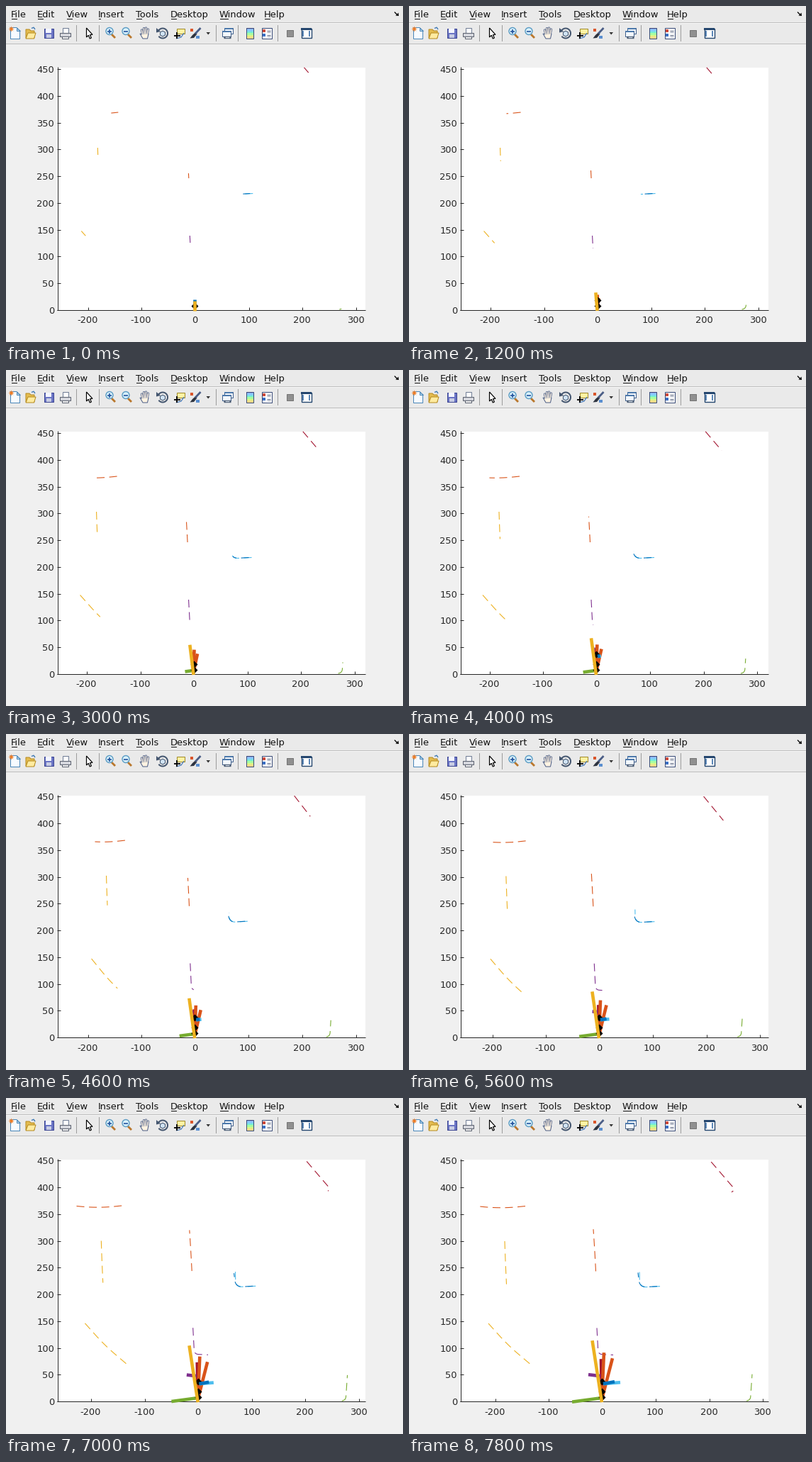
A matplotlib script that plays this animation: 560x474 px, repeating every 8000 ms.

```python
import numpy as np
import matplotlib.pyplot as plt
from matplotlib.animation import FuncAnimation
from matplotlib.patches import Circle, Polygon, Rectangle

W, H, DPI = 560, 474, 100
PX = 72 / DPI
STEP, FRAMES = 200, 40
UNIT = 0.7556                      # pixels per axis unit
LEFT, RIGHT, TOP = 72, 507, 87
INK = "#262626"
BLUE, ORANGE, YELLOW, PURPLE, GREEN, CYAN, MAROON = (
    "#0072BD", "#D95319", "#EDB120", "#7E2F8E", "#77AC30", "#4DBEEE", "#A2142F")

# The simulation advances once per step, apart from a few pauses (step numbers).
PAUSES = (5, 8, 11, 18, 22, 27, 29, 36)
LAST = FRAMES - 1 - len(PAUSES)
REFIT = 18                         # tick at which the view is fitted again

fig = plt.figure(figsize=(W / DPI, H / DPI), dpi=DPI, facecolor="#F0F0F0")
ax = fig.add_axes([0, 0, 1, 1])
ax.set_xlim(0, W)
ax.set_ylim(H, 0)
ax.axis("off")


def rect(x, y, w, h, fc, ec="none", lw=1, z=1):
    return ax.add_patch(Rectangle((x, y), w, h, fc=fc, ec=ec, lw=lw * PX, zorder=z))


def poly(pts, fc, ec="none", lw=1):
    ax.add_patch(Polygon(pts, fc=fc, ec=ec, lw=lw * PX, zorder=2))


def disc(x, y, r, fc, ec="none", lw=1):
    ax.add_patch(Circle((x, y), r, fc=fc, ec=ec, lw=lw * PX, zorder=2))


def line(pts, color, lw=1.0, z=3, **kw):
    xs, ys = zip(*pts) if len(pts) else ((), ())
    kw.setdefault("solid_capstyle", "butt")
    return ax.plot(xs, ys, color=color, lw=lw * PX, zorder=z, **kw)[0]


def label(x, y, s, color=INK, ha="center"):
    return ax.text(x, y, s, fontsize=13 * PX, color=color, ha=ha,
                   va="baseline", family="DejaVu Sans", zorder=4)


# ---- menu bar and toolbar ----
def menu_bar():
    rect(0, 0, W, 53, "#EAEAEA")
    rect(0, 23, W, 1, "#BEBEBE")
    rect(0, 24, W, 1, "#F8F8F8")
    rect(0, 53, W, 1, "#BEBEBE")
    words = "File Edit View Insert Tools Desktop Window Help".split()
    for x, word in zip((8, 45, 86, 131, 184, 233, 302, 365), words):
        label(x - 1, 16, word, "#111111", "left")
        rect(x, 18, {"I": 3, "W": 12}.get(word[0], 8), 1, "#111111")
    line([(548, 8.5), (552, 12.5)], "black", 1.3)
    poly([(554, 14), (549.5, 13.5), (553.5, 9.5)], "black")
    for x in (99, 131, 296, 327, 383):
        rect(x, 27, 1, 23, "#9C9C9C")


def file_icons():
    poly([(6.5, 30.5), (15, 30.5), (19.5, 35), (19.5, 46.5), (6.5, 46.5)], "#F7FBFF", "#4A86B8")
    poly([(15, 30.5), (15, 35), (19.5, 35)], "#BCDDF2", "#4A86B8")
    a = np.arange(16) * np.pi / 8
    r = np.where(np.arange(16) % 2, 1.8, 4.3)
    poly(np.c_[7.5 + r * np.cos(a), 32.5 + r * np.sin(a)], "#EE7E28")

    poly([(28, 45), (28, 33), (33, 33), (35, 35), (40, 35), (40, 45)], "#E4BC50", "#B58A1E")
    poly([(28, 46), (31, 38), (42, 38), (39.5, 46)], "#FFEBA0", "#B58A1E")
    line([(36, 31.5), (39, 30.2), (41, 33)], "#3F79B5", 1.4)

    rect(53.5, 31.5, 13, 13, "#6A74C4", "#3B4592")
    rect(56, 32, 8, 6, "#F4F6FF")
    rect(57, 40, 7, 5, "#C8CDE4")

    rect(79.5, 30.5, 8, 8, "white", "#6F7C94")
    poly([(76, 38), (91, 38), (91, 43), (76, 43)], "#D4D6DC", "#5A606E")
    rect(79, 41, 9, 5, "#F6F6F6", "#5A606E")

    poly([(113.5, 31), (113.5, 44), (116.3, 41.3), (118.3, 46), (120.4, 45),
          (118.4, 40.6), (122, 40.4)], "white", "black", 1.2)


def lens(x, plus):
    line([(x + 3, 40), (x + 8, 45)], "#B9772C", 2.8, 2)
    disc(x, 35.5, 5, "#D8F0FA", "#5B9CC4", 1.4)
    line([(x - 3, 35.5), (x + 3, 35.5)], "#1D4F9C", 1.6)
    if plus:
        line([(x, 32.5), (x, 38.5)], "#1D4F9C", 1.6)


def view_icons():
    lens(146, True)
    lens(169, False)

    for k, top in enumerate((34, 31.5, 31, 33)):          # hand
        tip = (191.5 + 3 * k, top)
        line([tip, (193 + 2 * k, 41)], "#4A5D86", 3.2, 2, solid_capstyle="round")
        line([tip, (193 + 2 * k, 41)], "#FFF3E2", 1.6, 3, solid_capstyle="round")
    poly([(189, 39), (192, 40), (201, 39), (199.5, 46), (193, 46)], "#FFF3E2", "#4A5D86")

    a = np.linspace(-2.6, 2.5, 30)
    line(list(zip(221 + 7 * np.cos(a), 38.5 + 7 * np.sin(a))), "#44566F", 2)
    poly([(212, 31), (212, 37.5), (218, 36)], "#44566F")
    poly([(217.5, 37), (221, 35.2), (224.5, 37), (224.5, 41), (221, 43), (217.5, 41)],
         "#CFE2F2", "#44566F")

    rect(240.5, 31.5, 11, 7, "#FFF3A3", "#A08A2A")
    line([(251, 38), (247, 44), (240, 46)], "#3D74B8", 1.2)
    line([(236.5, 41.5), (245.5, 41.5)], "black", 1.8, 4)
    line([(241, 37), (241, 46)], "black", 1.8, 4)

    line([(274.5, 31), (267, 39)], "#4A5D86", 2.8)
    poly([(267.5, 37), (269.5, 39.5), (265, 45), (259.5, 45.5), (263, 41)], "#2E3440")
    rect(260, 32, 4, 4, "#D9552B")
    rect(268, 42, 5, 4, "#5B8FD0")
    poly([(282.5, 37), (288, 37), (285.2, 40.5)], "#333333")


def panel_icons():
    for x, y in ((307.5, 30.5), (304.5, 34.5)):           # linked windows
        rect(x, y, 12, 8, "#F2F7FC", "#3F5F8C")
        rect(x, y, 12, 2, "#4C79AC")
    line([(307, 43.5), (317, 43.5)], "#44566F", 3.4)
    line([(309, 43.5), (315, 43.5)], "#DDE5EE", 1.2)

    for i, c in enumerate(plt.get_cmap("turbo")(np.linspace(0.12, 0.65, 6))):
        rect(339, 31 + 2.4 * i, 10, 2.5, 0.6 * c + 0.4)
    rect(338.5, 30.5, 10, 15, "none", "#3A4C78", z=3)

    rect(360.5, 30.5, 14, 15, "white", "#3A4C78")
    for y, c in ((33, "#CF4A3A"), (39, "#3A6FC4")):
        rect(362, y, 4, 4, c, z=2)
        line([(368, y + 1.5), (373, y + 1.5)], "#55607A")
        line([(368, y + 3.5), (373, y + 3.5)], "#8C95AA")

    rect(395.5, 33.5, 9, 9, "#909090", "#747474")
    rect(416.5, 31.5, 14, 13, "white", "#24466E", 1.4)
    rect(416, 31, 15, 3, "#24466E")
    for x in (418, 427):
        rect(x, 35, 2, 8, "#5D88B8")


menu_bar()
file_icons()
view_icons()
panel_icons()

# ---- plot frame ----
back = rect(LEFT, TOP, RIGHT - LEFT, 342, "white", z=0)
clip = Rectangle((LEFT, TOP - 1), RIGHT - LEFT, 343, transform=ax.transData)
y_axis = line([], INK)
x_axis = line([], INK)
x_ticks = [(v, line([], INK), label(0, 447, str(v))) for v in range(-200, 301, 100)]
y_ticks = [(v, line([], INK), label(68, 0, str(v), ha="right")) for v in range(0, 451, 50)]


def bend(a, b, c, r):
    """Path a-b-c with the corner rounded over a distance r."""
    a, b, c = (np.array(p, float) for p in (a, b, c))
    p = b + (a - b) * min(1, r / np.hypot(*(a - b)))
    q = b + (c - b) * min(1, r / np.hypot(*(c - b)))
    s = np.linspace(0, 1, 12)[:, None]
    return np.vstack([a, (1 - s) ** 2 * p + 2 * s * (1 - s) * b + s ** 2 * q, c])


def cut(path, first, grown):
    """Start of a path: `first` pixels long at grown = 0, all of it at 1."""
    run = np.r_[0, np.cumsum(np.hypot(*np.diff(path, axis=0).T))]
    size = first + (run[-1] - first) * grown
    end = [np.interp(size, run, path[:, k]) for k in (0, 1)]
    return np.vstack([path[run < size], end])


# Dashed trails: colour, dash phase, first length, path seen from the origin
TRAILS = [
    (MAROON, 11.5, 14.5, bend((151, 346), (188, 302.5), (183, 299), 5)),
    (ORANGE, 0, 10, bend((-108, 279), (-142, 275.5), (-177, 279), 25)),
    (YELLOW, 0, 10, bend((-137, 229), (-136, 200), (-134.5, 167.5), 20)),
    (YELLOW, 0, 9, bend((-160, 111.5), (-132, 80), (-97, 50), 20)),
    (ORANGE, 0, 7, bend((-8.5, 186), (-10, 215), (-12, 246), 20)),
    (PURPLE, 0, 10, bend((-7, 105), (-5, 67.5), (16, 66.5), 6)),
    (CYAN, 0, 14, bend((82, 164.5), (53.5, 163), (53, 191), 10)),
    (BLUE, 0, 10, bend((78, 164.5), (53.5, 163), (51, 184), 10)),
    (GREEN, 0, 3, bend((204, 1), (209.5, 2), (212, 39), 5)),
]
trails = []
for color, phase, first, path in TRAILS:
    art = line([], color, 1.1, 3, linestyle=(phase, (10, 6)), dash_capstyle="butt")
    art.set_clip_path(clip)
    trails.append((art, first, path))

# Thick rays: colour, tick of birth, base, first tip, last tip
RAYS = [
    (BLUE, 0, (0, 4), (0, 15), (3, 25)),
    (MAROON, 4, (0, 8), (0, 18), (-1, 60)),
    (PURPLE, 16, (-2, 36), (-3, 36), (-19, 38)),
    (GREEN, 5, (-1, 5), (-1, 5), (-42, -0.5)),
    (ORANGE, 3, (0, 3), (0, 18), (3, 69)),
    (ORANGE, 1, (0, 3), (0, 10), (15, 61)),
    (CYAN, 13, (2, 25), (3, 25), (26, 27)),
    (BLUE, 13, (2, 25), (3, 25), (18, 28)),
    (YELLOW, 0, (0, -1), (0, 13), (-13.5, 86)),
]
rays = [(line([], c, 4.6, 6 + i * 0.1), born, *map(np.array, ends))
        for i, (c, born, *ends) in enumerate(RAYS)]

NODES = ((6, 0), (14, 4), (28, 15))    # height and tick of birth
nodes = ax.plot([], [], "D", color="black", mec="none", zorder=6.55, ms=7.6 * PX)[0]


def view(n):
    """Origin in pixels and the scale of the trails at tick n."""
    if n < REFIT:
        return 266.3 - 2.6 * n / REFIT, 429, 1, 1
    u = (n - REFIT) / (LAST - REFIT)
    return 266.2 + 5.8 * u, 428.2, 1 - 0.09 * (1 - u) ** 2, 0.997 - 0.009 * u


def update(i):
    n = i - sum(p <= i for p in PAUSES)
    x0, y0, sx, sy = view(n)

    base = np.floor(y0) - 0.5
    back.set_height(base - TOP)
    y_axis.set_data([LEFT + 0.5] * 2, [TOP - 1, base + 0.5])
    x_axis.set_data([LEFT, RIGHT], [base, base])
    for v, tick, text in x_ticks:
        x = np.floor(x0 + v * UNIT + 0.2)
        tick.set_data([x + 0.5] * 2, [base - 4, base])
        text.set_x(x + 0.5)
    for v, tick, text in y_ticks:
        y = np.round(y0 - v * UNIT)
        tick.set_data([LEFT, LEFT + 5], [y - 0.5] * 2)
        text.set_y(y + 5)

    grown = min(1, n / (LAST - 2))
    for art, first, path in trails:
        p = cut(path, first, grown)
        art.set_data(x0 + sx * p[:, 0], y0 - sy * p[:, 1])

    for art, born, foot, start, stop in rays:
        tip = start + (stop - start) * (n - born) / (LAST - born)
        art.set_data([x0 + foot[0], x0 + tip[0]], [y0 - foot[1], y0 - tip[1]])
        art.set_visible(n >= born)

    ups = [up for up, born in NODES if n >= born]
    nodes.set_data([x0] * len(ups), [y0 - up for up in ups])
    return []


anim = FuncAnimation(fig, update, frames=FRAMES, interval=STEP, repeat=True,
                     repeat_delay=0, init_func=lambda: update(0), blit=False)
plt.show()
```
